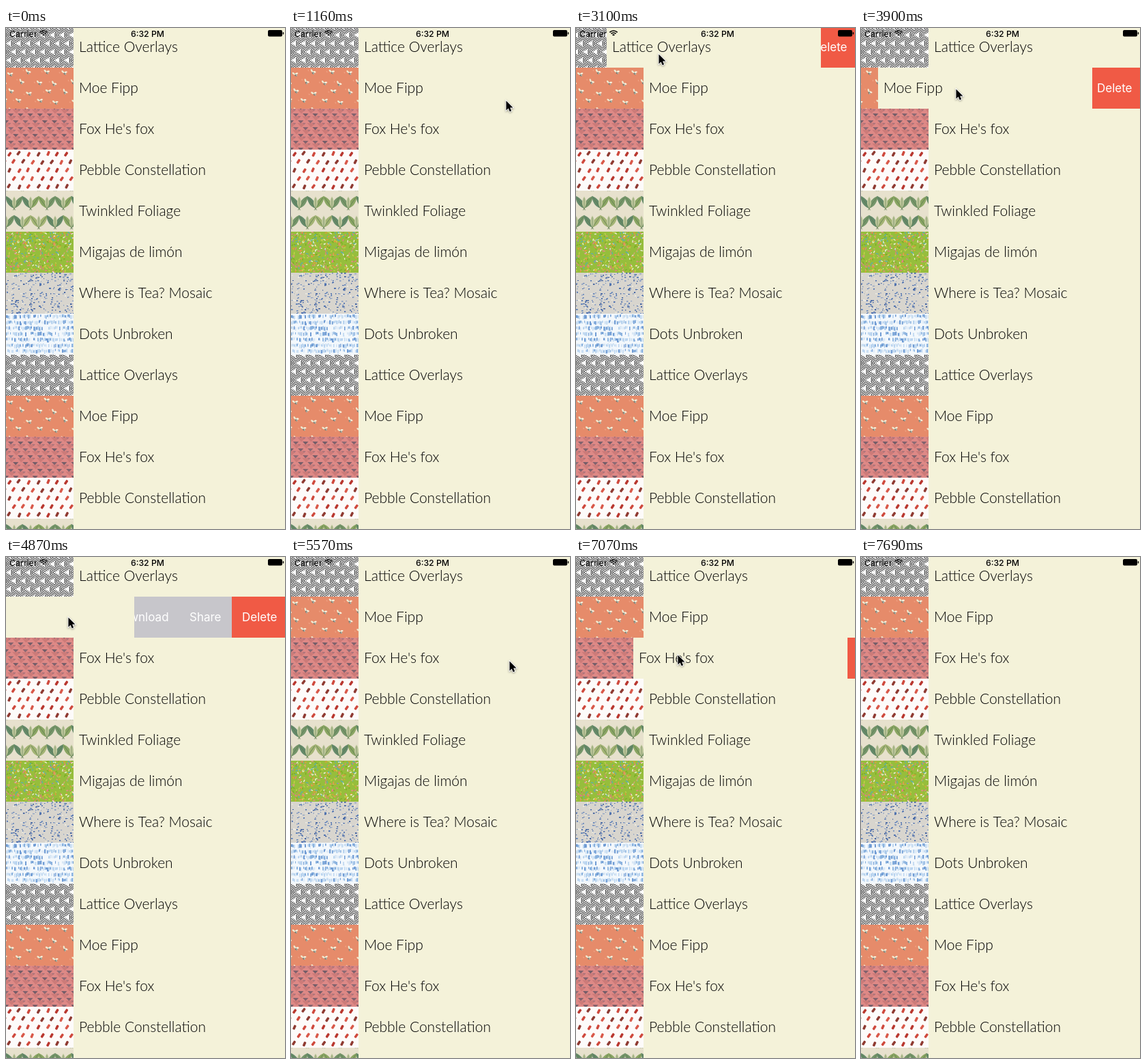
Recreate the animation shown at these times as an HTML page with a canvas. Size 409 by 733 pixels, loop 8.66 s.

```html
<!DOCTYPE html>
<html lang="en">
<head>
<meta charset="utf-8">
<title>Swipe actions</title>
<style>
  html, body { margin: 0; width: 100%; height: 100%; overflow: hidden; background: #f4f2d9; }
  canvas { display: block; width: 409px; height: 733px; }
</style>
</head>
<body>
<canvas id="stage" width="409" height="733"></canvas>
<script>
const W = 409, H = 733, ROW = 60, TOP = -2, THUMB = 99;
const LOOP = 8660, FIRST = 540, TICK = 88.27, LAST_TICK = 81;
const CREAM = '#f4f2d9', RED = '#f05a45', GREY = '#c7c6cb';
const OPEN_WIDTH = 269;
const ctx = document.getElementById('stage').getContext('2d');

const titles = [
  'Lattice Overlays', 'Moe Fipp', "Fox He's fox", 'Pebble Constellation',
  'Twinkled Foliage', 'Migajas de limón', 'Where is Tea? Mosaic', 'Dots Unbroken'
];

function randomizer(seed) {
  return () => {
    seed = (Math.imul(seed, 1664525) + 1013904223) >>> 0;
    return seed / 4294967296;
  };
}

function thumbnail(color, paint, seed) {
  const tile = document.createElement('canvas');
  tile.width = THUMB;
  tile.height = ROW;
  const g = tile.getContext('2d');
  g.fillStyle = color;
  g.fillRect(0, 0, THUMB, ROW);
  paint(g, randomizer(seed));
  return tile;
}

// Calls draw at each point of a brick-like grid, with the origin moved there.
function scatter(g, dx, dy, shift, draw) {
  for (let r = -1; r * dy < ROW + dy; r++) {
    for (let c = -1; c * dx < THUMB + dx; c++) {
      g.save();
      g.translate(c * dx + (r & 1 ? shift : 0), r * dy);
      draw();
      g.restore();
    }
  }
}

function pick(list, rnd) {
  return list[Math.floor(rnd() * list.length)];
}

function ellipse(g, x, y, rx, ry, turn, color) {
  g.fillStyle = color;
  g.beginPath();
  g.ellipse(x, y, rx, ry, turn, 0, Math.PI * 2);
  g.fill();
}

function triangle(g, color, size, x, y) {
  g.fillStyle = color;
  g.beginPath();
  g.moveTo(x - size, y - size * 0.5);
  g.lineTo(x + size, y - size * 0.4);
  g.lineTo(x, y + size * 0.6);
  g.fill();
}

function hexagons(g) {
  g.strokeStyle = '#111';
  scatter(g, 14.2, 12.3, 7.1, () => {
    for (let r = 2; r < 8; r += 2.5) {
      g.beginPath();
      for (let i = 0; i < 6; i++) {
        const a = (i + 0.5) * Math.PI / 3;
        g.lineTo(r * Math.cos(a), r * Math.sin(a));
      }
      g.stroke();
    }
  });
}

function blossoms(g, rnd) {
  scatter(g, 26, 14, 13, () => {
    g.translate(5 + rnd() * 6, 5 + rnd() * 5);
    g.rotate(0.2 + rnd() * 0.8);
    g.scale(0.8, 0.8);
    ellipse(g, 1, 1, 3.2, 2, 0.4, '#6f7069');
    ellipse(g, -3, 0, 3.2, 1.6, 0.3, '#f0e9cf');
    ellipse(g, 2, -1.6, 2.8, 1.6, -0.6, '#f6efd9');
    ellipse(g, 3, 1.6, 1.6, 1, 0, '#b9c4b5');
    ellipse(g, -8, 4, 1.6, 0.8, 0.5, '#f0a486');
  });
}

function wedges(g, rnd) {
  scatter(g, 14.2, 10, 7.1, () => {
    triangle(g, '#cc7b79', 6, 1, 4);
    triangle(g, pick(['#80626d', '#8c6a74', '#735d68'], rnd), 4.2, 0, -1);
    triangle(g, '#a9737a', 2.5, 5, 2);
  });
}

function dashes(g, rnd) {
  scatter(g, 14, 12, 6, () => {
    g.translate(4 + rnd() * 2, 5 + rnd() * 2);
    g.rotate(0.4 + rnd() * 0.25);
    g.fillStyle = pick(['#cf493d', '#d9594a', '#8f3a32', '#b9372f'], rnd);
    g.beginPath();
    g.roundRect(-1.8, -3.6, 3.6, 7, 1.2);
    g.fill();
  });
}

function leaf(g, turn, size, color) {
  g.save();
  g.rotate(turn);
  g.scale(size, size);
  g.fillStyle = color;
  g.strokeStyle = '#5c7c50';
  g.lineWidth = 0.7;
  g.beginPath();
  g.moveTo(0, 0);
  g.bezierCurveTo(-6, -8, -4, -16, 0, -22);
  g.bezierCurveTo(4, -16, 6, -8, 0, 0);
  g.fill();
  g.beginPath();
  g.moveTo(0, 3);
  g.lineTo(0, -19);
  g.stroke();
  g.restore();
}

function leaves(g, rnd) {
  const greens = ['#8aa563', '#64896a', '#a3b374', '#75956a'];
  scatter(g, 24, 28, 12, () => {
    g.translate(12, 26);
    leaf(g, -0.6, 1, pick(greens, rnd));
    leaf(g, 0.6, 1, pick(greens, rnd));
    leaf(g, 0, 0.8, '#bfc79c');
  });
}

function confetti(g, rnd) {
  const colors = ['#e8798a', '#f2efe0', '#58aeb0', '#e89a3c', '#79ad23', '#c7d44b', '#d9a07c'];
  for (let i = 0; i < 420; i++) {
    g.save();
    g.translate(rnd() * THUMB, rnd() * ROW);
    g.rotate(rnd() * Math.PI);
    g.fillStyle = pick(colors, rnd);
    g.fillRect(-1.6, -0.6, 2 + rnd() * 2, 1.3);
    g.restore();
  }
}

function crumbs(g, rnd) {
  const colors = ['#4a6eb0', '#6485bb', '#3f61a1', '#8fa2c4', '#eceae2'];
  for (let i = 0; i < 300; i++) {
    g.fillStyle = pick(colors, rnd);
    g.fillRect(Math.floor(rnd() * THUMB), Math.floor(rnd() * ROW), 1 + rnd() * 2, 1 + rnd());
  }
}

function strokes(g, rnd) {
  const colors = ['#b9d4ef', '#88b1de', '#d9e7f5', '#6f9bd4', '#c6dcf2', '#f4f8fc'];
  for (let y = 1; y < ROW; y += 8.4) {
    for (let x = 0; x < THUMB; x += 2) {
      g.fillStyle = pick(colors, rnd);
      g.fillRect(x, y + rnd() * 2, 1 + rnd() * 2, 3 + rnd() * 3);
    }
  }
}

const thumbs = [
  ['#fff', hexagons], ['#e68b6a', blossoms], ['#de8986', wedges], ['#fdfbfa', dashes],
  ['#e7e1cd', leaves], ['#96be3c', confetti], ['#d8d5ce', crumbs], ['#f3f8fc', strokes]
].map(([color, paint], i) => thumbnail(color, paint, 41 + i * 97));

// Ticks at which each row is pulled open and let go.
const swipes = [
  { open: 12.62, close: 26 },
  { open: 36, close: 48 },
  { open: 57, close: 70 }
];

const opened = t => 1 - Math.exp(-0.0733 * Math.max(0, t) ** 2.13);
const leftOpen = t => Math.exp(-0.179 * Math.max(0, t) ** 2);

function swipeOffset(row, tick) {
  const swipe = swipes[row];
  if (!swipe) return 0;
  return Math.round(OPEN_WIDTH * opened(tick - swipe.open) * leftOpen(tick - swipe.close));
}

// The pointer rests between moves.
const pointerMoves = [
  { from: 0, to: 3, x: 310, y: 128 },
  { from: 5, to: 11, x: 331, y: 44 },
  { from: 12, to: 15.8, x: 105, y: 51 },
  { from: 22, to: 24, x: 121, y: 38 },
  { from: 31, to: 36, x: 300, y: 93 },
  { from: 36, to: 38.9, x: 91, y: 88 },
  { from: 52, to: 57, x: 320, y: 152 },
  { from: 57, to: 61, x: 149, y: 143 }
];

function pointerAt(tick) {
  let x = 369, y = 325;
  for (const move of pointerMoves) {
    const p = Math.min(1, Math.max(0, (tick - move.from) / (move.to - move.from)));
    const eased = p * p * (3 - 2 * p);
    x += (move.x - x) * eased;
    y += (move.y - y) * eased;
  }
  return [Math.round(x), Math.round(y)];
}

function write(text, x, y, font, color, align = 'left') {
  ctx.font = font;
  ctx.fillStyle = color;
  ctx.textAlign = align;
  ctx.fillText(text, x, y);
}

function drawActions(y, edge) {
  ctx.save();
  ctx.beginPath();
  ctx.rect(edge, y, W - edge, ROW);
  ctx.clip();
  ctx.fillStyle = GREY;
  ctx.fillRect(144, y, 187, ROW);
  ctx.fillStyle = RED;
  ctx.fillRect(331, y, 78, ROW);
  for (const [label, x] of [['Download', 158], ['Share', 269], ['Delete', 346]]) {
    write(label, x, y + 36, '17px Inter, sans-serif', '#fff');
  }
  ctx.restore();
}

function drawRow(row, tick) {
  const y = TOP + row * ROW, offset = swipeOffset(row, tick), kind = row % titles.length;
  ctx.drawImage(thumbs[kind], -offset, y);
  write(titles[kind], 107 - offset, y + 37, '300 21px Lato, sans-serif', '#000');
  if (offset > 4) drawActions(y, W + 4 - offset);
}

function drawStatusBar() {
  write('Carrier', 5, 13, '12.3px Inter, sans-serif', '#000');
  write('6:32 PM', 207.5, 13, '500 12.3px Inter, sans-serif', '#000', 'center');
  ctx.strokeStyle = '#000';
  ctx.lineWidth = 1.7;
  for (let r = 2; r < 9; r += 3) {
    ctx.beginPath();
    ctx.arc(55, 12, r, -Math.PI * 0.75, -Math.PI * 0.25);
    ctx.stroke();
  }
  ctx.fillStyle = '#000';
  ctx.beginPath();
  ctx.roundRect(384, 3, 21, 9.5, 2);
  ctx.roundRect(405.7, 6, 1.5, 3.5, 0.7);
  ctx.fill();
}

const arrow = new Path2D('M.5 .5V16L4 12.7L6.3 18L9 16.9L6.8 11.8L11.6 11.6Z');

function drawPointer(x, y) {
  ctx.save();
  ctx.translate(x, y);
  ctx.scale(0.9, 0.9);
  ctx.shadowColor = 'rgba(0,0,0,.4)';
  ctx.shadowBlur = 3;
  ctx.shadowOffsetY = 1;
  ctx.strokeStyle = '#fff';
  ctx.lineWidth = 2;
  ctx.stroke(arrow);
  ctx.shadowColor = 'transparent';
  ctx.fillStyle = '#000';
  ctx.fill(arrow);
  ctx.restore();
}

function render(now) {
  const time = now % LOOP;
  const tick = Math.min(LAST_TICK, Math.floor((time - FIRST + 8) / TICK));
  ctx.fillStyle = CREAM;
  ctx.fillRect(0, 0, W, H);
  for (let row = 0; TOP + row * ROW < H; row++) drawRow(row, tick);
  drawStatusBar();
  if (tick >= 0 && tick < LAST_TICK) drawPointer(...pointerAt(tick));
}

const start = performance.now();
function frame() {
  render(performance.now() - start);
  requestAnimationFrame(frame);
}
frame();
</script>
</body>
</html>
```
